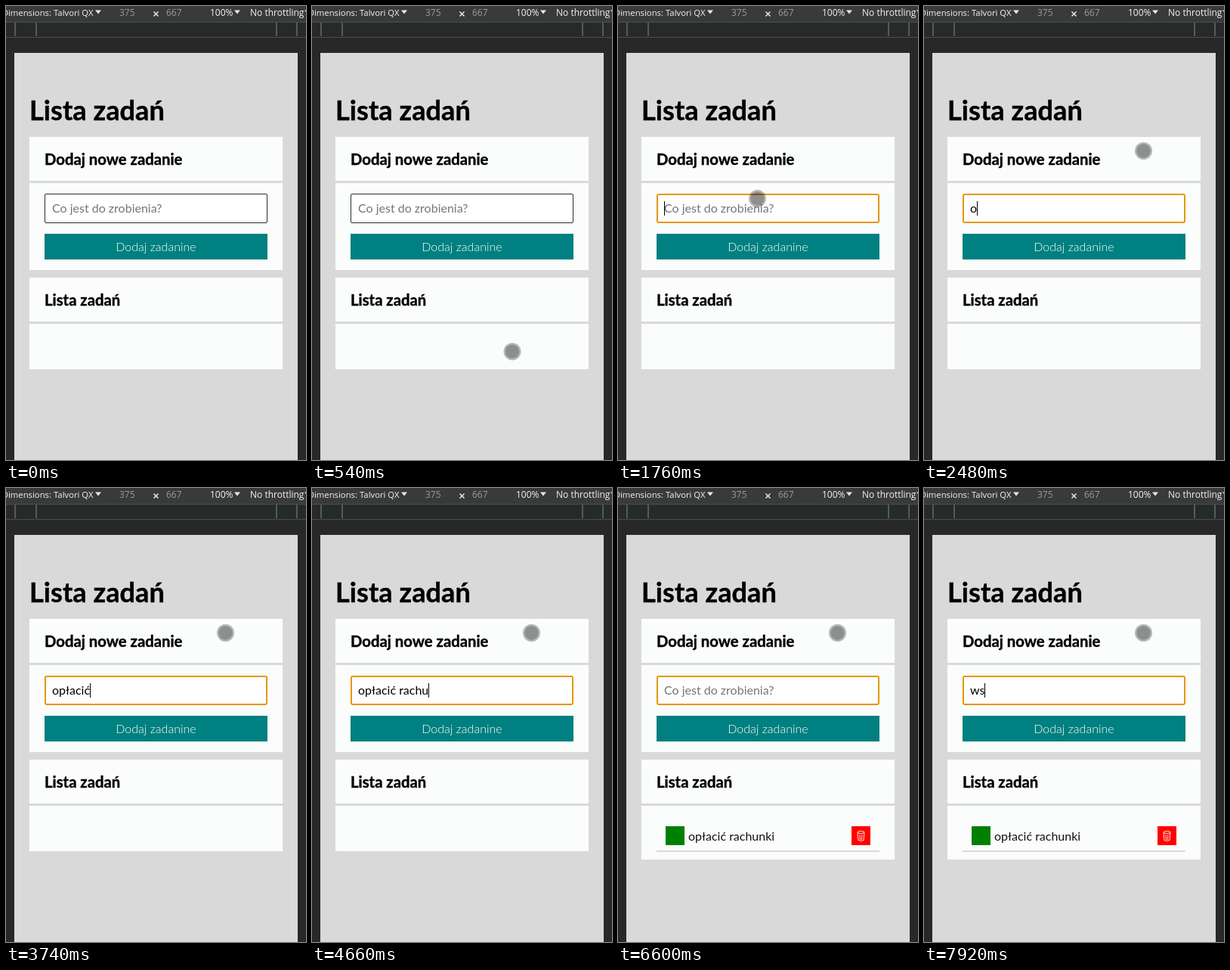
An HTML page for the animation above (8 s loop, 397 px wide and 600 px high).

```html
<!DOCTYPE html>
<html lang="pl">
<head>
<meta charset="utf-8">
<title>Lista zadań</title>
<style>
html, body { margin: 0; width: 100%; height: 100%; overflow: hidden; background: #282828; }
svg { display: block; width: 397px; height: 600px; }
text { font-family: Lato, sans-serif; font-size: 16px; white-space: pre; }
.bar text { font: 12px "Open Sans", "Noto Sans", sans-serif; fill: #f4f4f4; }
.bar .device { font-size: 11.3px; }
.bar .dim { fill: #9b9b9b; }
.h1, .h2 { font-weight: 700; stroke: #000; stroke-width: .4px; }
.h1 { font-size: 36.2px; }
.h2 { font-size: 20.3px; }
.light { font-weight: 300; fill: #fff; }
</style>
</head>
<body>
<svg viewBox="0 0 397 600">
  <rect width="397" height="600" fill="#282828"/>
  <g class="bar">
    <rect width="397" height="21" fill="#3a3a3a"/>
    <rect y="21" width="397" height="1" fill="#4a4d4d"/>
    <rect y="22" width="397" height="19" fill="#272a2a"/>
    <rect y="41" width="397" height="1" fill="#4a4d4d"/>
    <path d="M12 22V40M40 22V40M358 22V40M385 22V40" stroke="#555a5a" stroke-width="2"/>
    <text class="device" x="60" y="13" text-anchor="end">Dimensions:</text>
    <text class="device" x="63" y="13">Talvori QX</text>
    <text class="dim" x="150" y="13">375</text>
    <path d="M195.500 7.500L201.500 13.500M201.500 7.500L195.500 13.500" stroke="#e8e8e8" stroke-width="1.500"/>
    <text class="dim" x="212" y="13">667</text>
    <text x="270" y="13">100%</text>
    <text x="323" y="13">No throttling</text>
    <path d="M118 5.500h8l-4 5zM302 5.500h8l-4 5zM395 5.500h8l-4 5z" fill="#e8e8e8"/>
  </g>
  <rect x="11" y="62" width="375" height="538" fill="#d9d9d9"/>
  <text class="h1" x="31" y="151">Lista zadań</text>
  <g fill="#fbfdfc">
    <rect x="31" y="173" width="335" height="58"/>
    <rect x="31" y="234" width="335" height="115"/>
    <rect x="31" y="359" width="335" height="58"/>
    <rect id="list" x="31" y="420" width="335" height="60"/>
  </g>
  <text class="h2" x="51" y="210">Dodaj nowe zadanie</text>
  <text class="h2" x="51" y="396">Lista zadań</text>
  <rect id="idle" x="51.500" y="248.500" width="294" height="38" rx="1.500" fill="#fff" stroke="#2c2c2c"/>
  <rect id="focus" x="52" y="249" width="293" height="37" rx="2" fill="#fff" stroke="#e59700" stroke-width="2"/>
  <text id="hint" x="61" y="273" fill="#757575">Co jest do zrobienia?</text>
  <text id="typed" x="61" y="273"></text>
  <rect id="caret" y="258" width="1" height="19"/>
  <rect x="51" y="301" width="295" height="34" fill="#008080"/>
  <text class="light" x="198.500" y="324" text-anchor="middle">Dodaj zadanine</text>
  <g id="item">
    <rect x="63" y="447" width="25" height="25" fill="#008000"/>
    <text x="93" y="466" fill="#111">opłacić rachunki</text>
    <rect x="309" y="447" width="25" height="25" fill="#f00"/>
    <g fill="none" stroke="#ffe9e9">
      <ellipse cx="321.500" cy="455" rx="4.500" ry="1.500"/>
      <path d="M317 455.500L318 465.500Q321.500 467.500 325 465.500L326 455.500M320 458L320.500 465M323 458L322.500 465"/>
    </g>
    <rect x="51" y="479" width="295" height="2" fill="#d9d9d9"/>
  </g>
  <g id="cursor">
    <circle r="11.500" fill-opacity=".28"/>
    <circle r="9.200" fill-opacity=".22"/>
  </g>
</svg>
<script>
const LOOP = 8000, ENTER = 330, FOCUS = 1620, SUBMIT = 5730;
const STEP = 67.5;  // the pointer moves in steps of this length
const BLINK = 490;
const $ = id => document.getElementById(id);

// Each burst of activity: pace lists [time, letters typed].
const bursts = [
  { text: '', pace: [[FOCUS, 0]] },
  { text: 'opłacić rachunki', pace: [[2480, 1], [3010, 3], [3340, 6], [3740, 7], [5130, 16]] },
  { text: 'ws', pace: [[7720, 1], [7920, 2]] },
];
const route = [[ENTER, 306, 547], [870, 176.5, 261.5], [1220, 171, 262],
  [FOCUS, 171, 262], [1747, 184.5, 254.5], [1882, 290.5, 191.5]];

const linear = k => k;
const smooth = k => k * k * (3 - 2 * k);
const show = (id, on) => $(id).setAttribute('visibility', on ? 'visible' : 'hidden');

// Values between key points given as [time, ...values].
function track(points, t, ease) {
  const i = points.findIndex(p => p[0] > t);
  if (i <= 0) return points.at(i).slice(1);
  const [t0, ...from] = points[i - 1], [t1, ...to] = points[i];
  const k = ease((t - t0) / (t1 - t0));
  return from.map((v, n) => v + (to[n] - v) * k);
}

function draw(t) {
  const burst = bursts.findLast(b => b.pace[0][0] <= t);
  const submitted = t >= SUBMIT;
  let value = '', caret = false;
  if (burst) {
    const [count] = track(burst.pace, t, linear);
    const cleared = submitted && burst.pace[0][0] < SUBMIT;
    if (!cleared) value = burst.text.slice(0, Math.floor(count + .1));
    const rest = Math.max(0, t - burst.pace.at(-1)[0]);
    caret = Math.floor(rest / BLINK) % 2 === 0;
  }
  $('typed').textContent = value;
  $('caret').setAttribute('x', 61 + Math.floor(value && $('typed').getComputedTextLength()));
  show('hint', !value);
  show('caret', caret);
  show('idle', !burst);
  show('focus', burst);

  show('item', submitted);
  $('list').setAttribute('height', submitted ? 71 : 60);

  const seen = ENTER + Math.floor((t - ENTER) / STEP) * STEP;
  show('cursor', t >= ENTER);
  $('cursor').setAttribute('transform', `translate(${track(route, seen, smooth)})`);
}

const start = performance.now();
function loop() {
  draw((performance.now() - start) % LOOP);
  requestAnimationFrame(loop);
}
loop();
</script>
</body>
</html>
```
